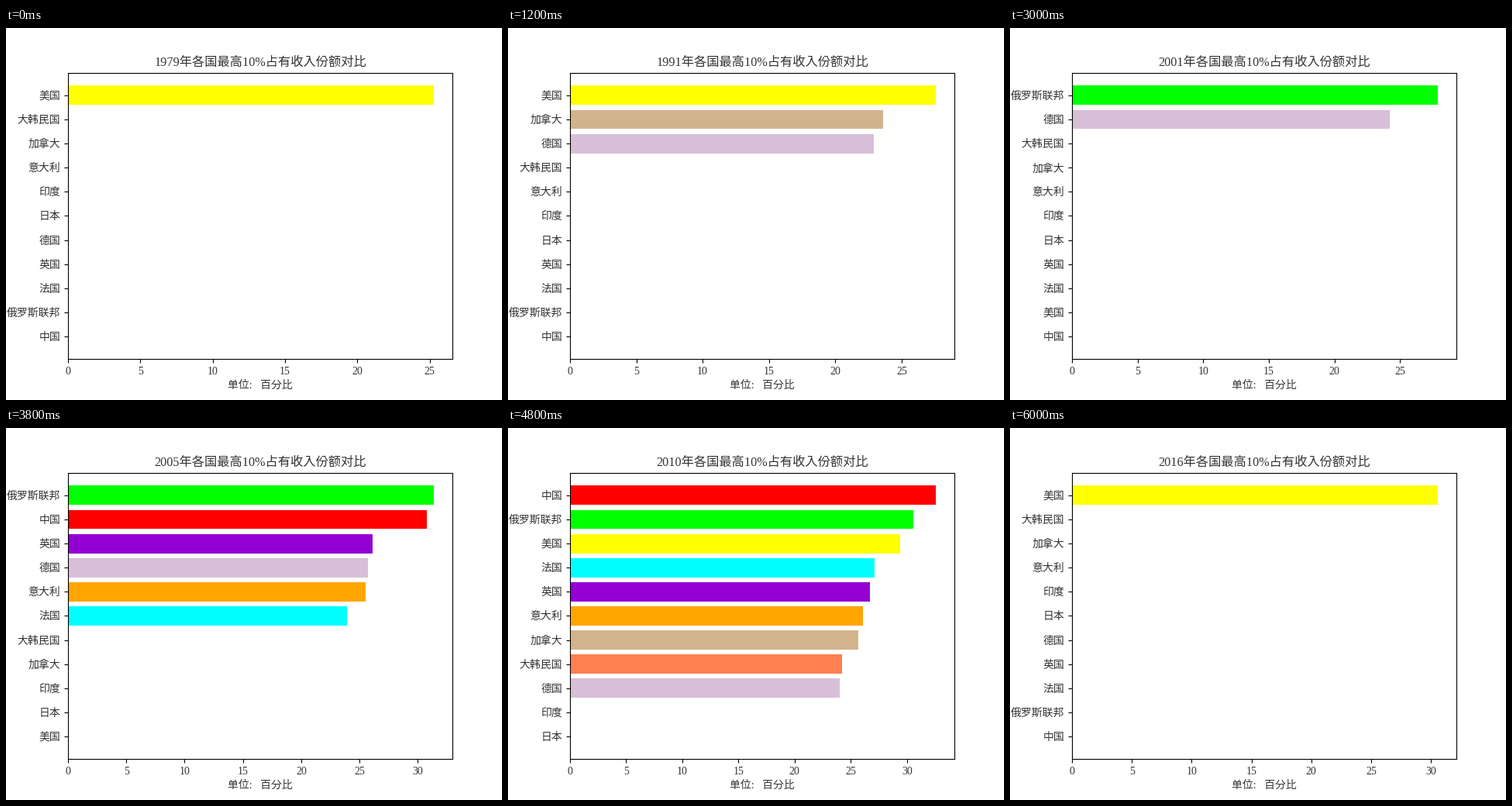
These frames come from a looping animation (640 px wide and 480 px high, 6200 ms). A matplotlib script:

```python
import matplotlib.pyplot as plt
import numpy as np
from matplotlib.animation import FuncAnimation

INK = "0.2"  # softens the sans glyphs to a light stroke
plt.rcParams.update({
    "font.family": ["Liberation Serif", "Noto Sans CJK JP"],
    "xtick.labelcolor": INK,
    "ytick.labelcolor": INK,
    "axes.labelcolor": INK,
    "axes.titlecolor": INK,
    "axes.titlesize": 11.7,
    "axes.labelpad": 3.5,
})

colors = {}
shares = {}


def country(name, color, surveys, **points):
    """Share in each survey year, on straight lines between key points."""
    keys = [int(key[1:]) for key in points]
    colors[name] = color
    shares[name] = {year: np.interp(year, keys, list(points.values()))
                    for year in surveys}


# The order here decides how countries without data are stacked.
country("中国", "red", [*range(1990, 2009, 3), *range(2010, 2016)],
        y1990=25.3, y1996=27.3, y2002=32.2, y2005=30.8, y2010=32.6, y2015=29.4)
country("俄罗斯联邦", "lime", [1993, 1996, 1997, *range(1999, 2016)],
        y1993=38.1, y1996=35.6, y1997=29.5, y2001=27.9, y2005=31.4,
        y2007=33.1, y2010=30.6, y2013=32.0, y2015=29.7)
country("美国", "yellow", [1979, 1986, *range(1991, 2001, 3), *range(2004, 2017, 3)],
        y1979=25.3, y1991=27.6, y2000=30.1, y2007=30.7, y2010=29.4, y2016=30.6)
country("法国", "cyan", range(2003, 2016),
        y2003=25.1, y2005=23.9, y2010=27.1, y2015=26.4)
country("英国", "darkviolet", range(2004, 2016),
        y2004=27.5, y2005=26.1, y2010=26.7, y2015=25.0)
country("德国", "thistle", [1991, 1994, 1995, 1998, *range(2000, 2016)],
        y1991=22.9, y2000=23.0, y2001=24.2, y2004=24.0, y2005=25.7,
        y2010=24.0, y2015=24.8)
country("日本", "pink", [2008], y2008=24.8)
country("印度", "green", [1983, 1987, 1993, 2004, 2009, 2011],
        y1983=26.6, y1993=26.8, y2011=29.8)
country("意大利", "orange", range(2004, 2016),
        y2004=26.9, y2005=25.5, y2010=26.1, y2015=25.6)
country("加拿大", "tan",
        [1981, 1987, *range(1991, 2001, 3), 1998, *range(2004, 2014, 3)],
        y1981=24.4, y1991=23.6, y1998=23.9, y2004=25.6, y2010=25.7)
country("大韩民国", "coral", range(2006, 2013, 2), y2010=24.2, y2012=23.8)

years = sorted(set().union(*shares.values()))

fig, ax = plt.subplots(figsize=(6.4, 4.8), dpi=100)


def draw(i):
    year = years[i]
    names = sorted(shares, key=lambda n: shares[n].get(year, 0))
    rows = range(len(names))
    ax.clear()
    ax.barh(rows, [shares[n].get(year, 0) for n in names],
            color=[colors[n] for n in names])
    ax.set_yticks(rows, names)
    ax.set_title(f"{year}年各国最高10%占有收入份额对比")
    ax.set_xlabel("单位:   百分比")


anim = FuncAnimation(fig, draw, frames=len(years), interval=200,
                     repeat=True, repeat_delay=0)
plt.show()
```
